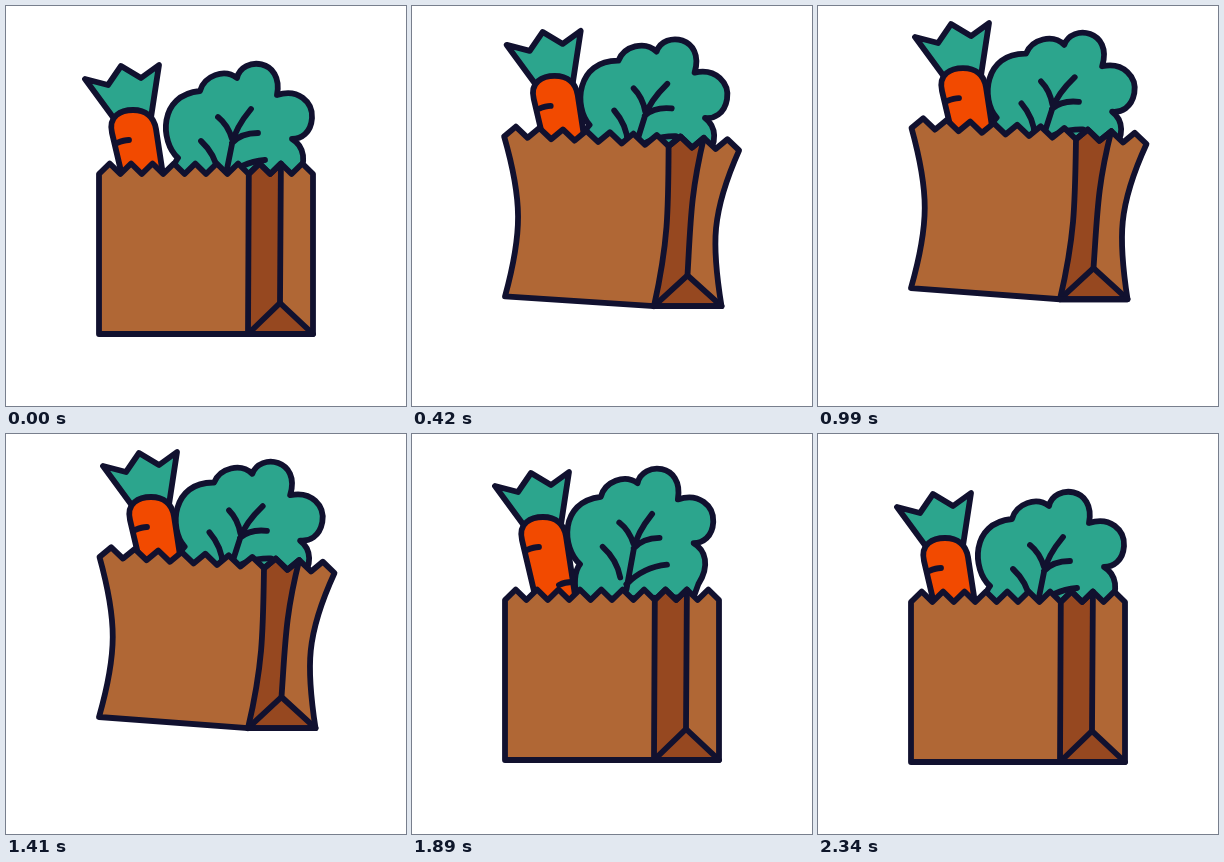
Write an HTML page with a canvas that moves like this. It is 400x400 px and loops after 4.37 s.

```html
<!DOCTYPE html>
<html>
<head>
<meta charset="utf-8">
<style>
html, body { margin: 0; width: 100%; height: 100%; overflow: hidden; background: #fff; }
canvas { display: block; width: 100vmin; height: 100vmin; }
</style>
</head>
<body>
<canvas width="400" height="400"></canvas>
<script>
const ctx = document.querySelector('canvas').getContext('2d');
const INK = '#11112f', BROWN = '#b06735', DARK = '#964820', TEAL = '#2ca58d', ORANGE = '#f24a00';
const LOOP = 4370, STEP = 30, PEAK = 1650, LAND = 1890, END = 2340;

const leaf = new Path2D('M79 73L102 79L115 60L135 72L153 59L144 118H112Z');
const root = new Path2D('M122 195L106 127C102 110 115 104 127 104C140 104 148 111 150 123L161 195Z');
const marks = new Path2D('M111 137Q118 134 123 134M143 172Q149 169 156 169');
const head = new Path2D('M168 187C165 168 167 158 172 152C154 136 152 89 194 85' +
  'C198 70 218 62 231 72C236 50 278 52 271 89C292 82 307 96 306 112' +
  'C305 127 295 133 286 133C298 140 302 156 290 174L285 187Z');
const veins = new Path2D('M245 103C235 115 228 128 226 138L218 178M212 111Q222 119 226 133' +
  'M252 127Q235 127 226 137M195 135Q209 148 212 166M259 154Q235 156 218 173');

// Eased rise from 0 to 1 between two times
function ramp(t, from, to) {
  const u = Math.min(1, Math.max(0, (t - from) / (to - from)));
  return u * u * (3 - 2 * u);
}

function motion(t) {
  const since = Math.max(0, t - LAND) * 2 * Math.PI;
  const swing = ramp(t, PEAK, LAND) * (1 - ramp(t, LAND, END));
  return {
    rise: 35 * ramp(t, 0, 540) + 3 * ramp(t, 540, 1020) - ramp(t, 1020, 1410) +
      8 * ramp(t, 1410, PEAK) - 45 * ramp(t, PEAK, 1925),
    lean: 2 * (ramp(t, 0, 540) - ramp(t, 1410, LAND)),
    pinch: ramp(t, 0, 300) - ramp(t, PEAK, LAND),
    kick: ramp(t, 1410, PEAK) - ramp(t, PEAK, LAND),
    hop: 19 * swing ** 2 * Math.cos(since / 300),
    sway: 8 * swing * Math.cos(since / 360 + 1.05)
  };
}

function paint(path, fill) {
  if (fill) {
    ctx.fillStyle = fill;
    ctx.fill(path);
  }
  ctx.stroke(path);
}

function drawCarrot({ lean, hop, sway }) {
  ctx.save();
  ctx.translate(9 * lean + sway, -2 * lean - hop);
  paint(leaf, TEAL);
  paint(root, ORANGE);
  paint(marks);
  ctx.restore();
}

function drawLettuce({ lean, pinch, hop }) {
  ctx.save();
  ctx.translate(235 + 5.5 * lean - hop / 4, 110 + 2.5 * lean - 1.1 * hop);
  ctx.rotate((2.5 * pinch + 2 * lean - hop / 19) * Math.PI / 180);
  ctx.translate(-235, -110);
  paint(head, TEAL);
  paint(veins);
  ctx.restore();
}

function drawBag({ lean, pinch, kick }) {
  const tilt = 4 * lean, shift = 5.5 * lean, spread = 10.5 * pinch, waist = pinch + kick / 4;
  const left = [93 + shift - spread, 168 - tilt];
  const right = [307 + shift + spread, 168 + tilt];
  const baseLeft = [93 - 4 * kick, 328 - tilt - 3 * kick];
  const baseFold = [242 + 3 * kick, 328 + .4 * tilt + 5.5 * kick];
  const baseRight = [307 + 2.5 * pinch + 5.5 * kick, 328 + (.4 * tilt - 2 * kick)];
  const apex = [274 + 1.5 * pinch + kick, 297 + 3 * pinch - 3 * kick];

  // Even steps along the rim are valleys, odd steps are peaks
  const rim = k => [
    left[0] + (right[0] - left[0]) * k / 20,
    left[1] + (right[1] - left[1]) * k / 20 - (k % 2) * 10.5
  ];
  const zigzag = (path, from, to) => {
    for (let k = from; k <= to; k++) path.lineTo(...rim(k));
  };
  const bend = (path, [x0, y0], [x1, y1], bulge) => {
    const x = (x0 + x1) / 2 + bulge * waist, h = y1 - y0;
    path.bezierCurveTo(x, y0 + .4 * h, x, y0 + .6 * h, x1, y1);
  };

  const body = new Path2D();
  zigzag(body, 0, 20);
  bend(body, right, baseRight, -19);
  body.lineTo(...baseFold);
  body.lineTo(...baseLeft);
  bend(body, baseLeft, left, 18);
  body.closePath();

  const side = new Path2D();
  zigzag(side, 14, 17);
  bend(side, rim(17), apex, -5);
  side.lineTo(...baseRight);
  side.lineTo(...baseFold);
  bend(side, baseFold, rim(14), 7);

  const edge = new Path2D();
  edge.moveTo(...baseFold);
  edge.lineTo(...apex);

  ctx.fillStyle = BROWN;
  ctx.fill(body);
  paint(side, DARK);
  paint(edge);
  paint(body);
}

function frame(now) {
  const pose = motion(Math.min(Math.floor(now % LOOP / STEP) * STEP, END));
  ctx.fillStyle = '#fff';
  ctx.fillRect(0, 0, 400, 400);
  ctx.save();
  ctx.translate(0, -pose.rise);
  ctx.strokeStyle = INK;
  ctx.lineWidth = 5.8;
  ctx.lineJoin = ctx.lineCap = 'round';
  drawLettuce(pose);
  drawCarrot(pose);
  drawBag(pose);
  ctx.restore();
}

const start = performance.now();
function tick() {
  frame(performance.now() - start);
  requestAnimationFrame(tick);
}
tick();
</script>
</body>
</html>
```
